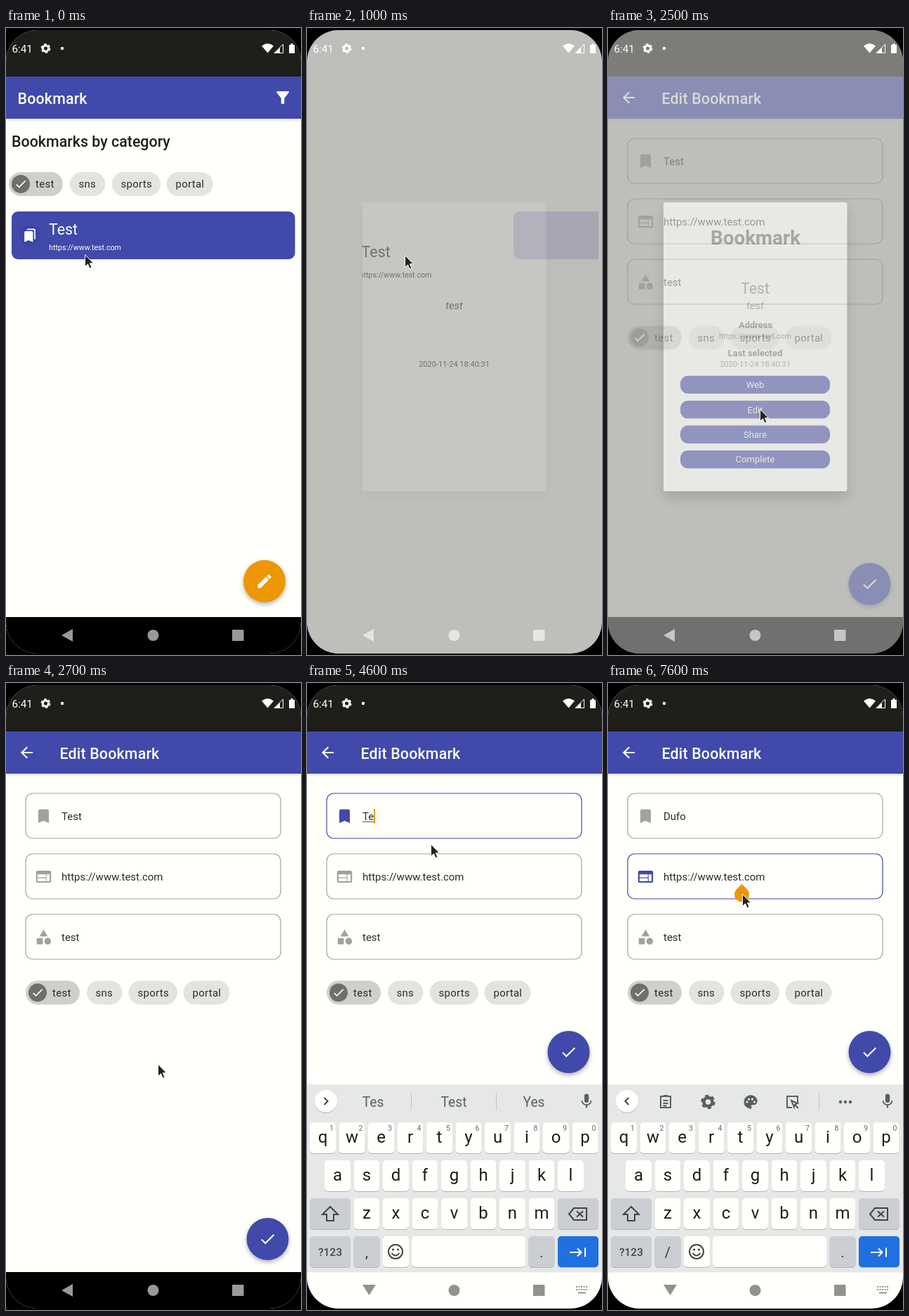
These frames come from a looping animation (420x892 px, 8000 ms). An HTML page:

```html
<!DOCTYPE html>
<html lang="en">
<head>
<meta charset="utf-8">
<title>Bookmark app</title>
<style>
html, body { margin: 0; width: 100%; height: 100%; overflow: hidden; background: #000; }
svg { display: block; width: 420px; height: 892px; font-family: Roboto, sans-serif; }
text { white-space: pre; }
.mid { text-anchor: middle; }
.raised { filter: drop-shadow(0 3px 3px rgba(0,0,0,.3)); }
.bar { filter: drop-shadow(0 1px 2px rgba(0,0,0,.2)); }
.key { filter: drop-shadow(0 1px 0 rgba(0,0,0,.22)); }
.window { filter: drop-shadow(0 9px 9px rgba(0,0,0,.22)); }
.line { fill: none; stroke-width: 2; }
</style>
</head>
<body>
<svg id="stage" viewBox="0 0 420 892"></svg>
<script>
const BLUE = '#4149ab', ORANGE = '#ee9704', PAPER = '#fffffb', INK = '#2b2b29', SOFT = '#71726d', KEYINK = '#5b5e61';
const DIM = 'rgba(0,0,0,.37)', CHIP = 'rgba(0,0,0,.11)', CHECKED = 'rgba(0,0,0,.19)';
const $ = id => document.getElementById(id);

const PATHS = {
  bookmark: 'M17 3H7c-1.1 0-2 .9-2 2v16l7-3 7 3V5c0-1.1-.9-2-2-2z',
  bookmarks: 'M19 18l2 1V3c0-1.1-.9-2-2-2H9C7.9 1 7 1.9 7 3h10c1.1 0 2 .9 2 2zM15 5H5c-1.1 0-2 .9-2 2v16l7-3 7 3V7c0-1.1-.9-2-2-2z',
  web: 'M20 4H4c-1.1 0-2 .9-2 2v12c0 1.1.9 2 2 2h16c1.1 0 2-.9 2-2V6c0-1.1-.9-2-2-2zm-5 14H4v-4h11zm0-5H4V9h11zm5 5h-4V9h4z',
  category: 'M12 2l-5.5 9h11zM3 13.5h8v8H3zM13 17.5a4.5 4.5 0 1 0 9 0a4.5 4.5 0 1 0-9 0',
  edit: 'M3 17.25V21h3.75L17.8 9.94l-3.75-3.75zM20.7 7.04a1 1 0 0 0 0-1.41l-2.34-2.34a1 1 0 0 0-1.41 0l-1.83 1.83 3.75 3.75z',
  check: 'M9 16.17L4.83 12l-1.42 1.41L9 19 21 7l-1.41-1.41z',
  back: 'M20 11H7.83l5.59-5.59L12 4l-8 8 8 8 1.41-1.41L7.83 13H20z',
  filter: 'M4.25 5.61L10 13v6c0 .55.45 1 1 1h2c.55 0 1-.45 1-1v-6l5.74-7.39c.51-.66.04-1.61-.79-1.61H5.04c-.83 0-1.3.95-.79 1.61z',
  mic: 'M12 14c1.66 0 3-1.34 3-3V5a3 3 0 0 0-6 0v6c0 1.66 1.34 3 3 3zm5.3-3c0 3-2.54 5.1-5.3 5.1S6.7 14 6.7 11H5c0 3.41 2.72 6.23 6 6.72V21h2v-3.28c3.28-.48 6-3.3 6-6.72z',
  palette: 'M12 3a9 9 0 0 0 0 18c.83 0 1.5-.67 1.5-1.5 0-.39-.15-.74-.39-1-.23-.27-.38-.62-.38-1 0-.83.67-1.5 1.5-1.5H16c2.76 0 5-2.24 5-5 0-4.42-4.03-8-9-8z'
};

// Markup helpers
const rect = (x, y, w, h, r, fill, more = '') => `<rect x="${x}" y="${y}" width="${w}" height="${h}" rx="${r}" fill="${fill}" ${more}/>`;
const circle = (x, y, r, fill, more = '') => `<circle cx="${x}" cy="${y}" r="${r}" fill="${fill}" ${more}/>`;
const text = (x, y, size, fill, str, more = '') => `<text x="${x}" y="${y}" font-size="${size}" fill="${fill}" ${more}>${str}</text>`;
const mid = (x, y, size, fill, str, more = '') => text(x, y, size, fill, str, 'class="mid" ' + more);
const line = (d, color, more = '') => `<path class="line" d="${d}" stroke="${color}" ${more}/>`;
const icon = (name, x, y, fill, s = 1.07, more = '') =>
  `<path d="${PATHS[name]}" fill="${fill}" transform="translate(${x} ${y}) scale(${s}) translate(-12 -12)" ${more}/>`;
const group = (id, body, more = '') => `<g id="${id}" ${more}>${body}</g>`;
const gear = (x, y, r, color) =>
  circle(x, y, r * .6, 'none', `stroke="${color}" stroke-width="${r * .45}"`) +
  circle(x, y, r * .87, 'none', `stroke="${color}" stroke-width="${r * .3}" stroke-dasharray="${r * .5} ${r * .411}"`);

const chips = (dx, dy) => `<g transform="translate(${dx} ${dy})">` +
  [['test', 4, 77, 42], ['sns', 91, 50.5, 103.5], ['sports', 150.5, 69.5, 163.5], ['portal', 228.5, 66, 241.5]].map(([name, x, w, tx], i) =>
    rect(x, 205, w, 34, 17, i ? CHIP : CHECKED) + text(tx, 227, 15, INK, name, 'letter-spacing=".27"')).join('') +
  circle(21, 222, 13, '#6f706b') + icon('check', 21, 222, '#fff', .8) + '</g>';

const chrome = (x, title) => rect(0, 0, 420, 69, 0, '#1e1f1a') + rect(0, 69, 420, 60, 0, BLUE, 'class="bar"') +
  rect(0, 838, 420, 54, 0, '#000') + text(x, 107.5, 21.4, PAPER, title, 'font-weight="500" letter-spacing=".16"');

const listPage = group('list', chrome(16.5, 'Bookmark') + icon('filter', 394, 99, '#fff', 1.12) +
  text(8, 169, 21.4, '#1e1f1c', 'Bookmarks by category', 'font-weight="500"') + chips(0, 0) +
  circle(368, 787, 30, ORANGE, 'class="raised"') + icon('edit', 368, 787, '#fff'));

const card = `<g clip-path="url(#row)">` + group('card', rect(8, 261, 403.5, 68, 9, BLUE) +
  group('cardBody', circle(34, 295, 14.5, '#3b43a6') + icon('bookmarks', 34, 295, '#fff', .87) +
    text(61, 293.5, 21.4, '#fff', 'Test') + text(61, 316, 10.7, '#fff', 'https://www.test.com'))) + '</g>';

const field = (i, name, str) => {
  const y = 157 + 86 * i;
  return rect(28, y, 363, 64, 10, 'none', `id="box${i}" stroke-width="1.2"`) +
    icon(name, 53.5, y + 32.5, DIM, 1.07, `id="icon${i}"`) + text(79, y + 38, 15, INK, str, `id="value${i}"`);
};
const editPage = group('edit', chrome(76.5, 'Edit Bookmark') + icon('back', 29.5, 99, '#fff') +
  field(0, 'bookmark', 'Test') + field(1, 'web', 'https://www.test.com') + field(2, 'category', 'test') +
  text(79, 195, 15, '#8f908b', 'Bookmark title', 'id="hint"') +
  rect(79, 197, 0, 1, 0, '#555', 'id="underline"') + rect(0, 0, 2, 21, 0, ORANGE, 'id="caret"') +
  chips(24, 218.5) +
  group('done', circle(372.5, 791, 30, BLUE, 'class="raised"') + icon('check', 372.5, 791, '#fff')));

const dialog = group('dialog', rect(79, 248, 261.5, 411, 3, PAPER) + group('content',
  mid(210, 308.3, 27.8, SOFT, 'Bookmark', 'font-weight="700"') +
  mid(210, 427, 12.9, SOFT, 'Address', 'font-weight="700"') +
  mid(209.5, 467, 12.9, SOFT, 'Last selected', 'font-weight="700"') +
  ['Web', 'Edit', 'Share', 'Complete'].map((name, i) =>
    rect(103, 494.8 + 35.4 * i, 213, 25.4, 11, BLUE) + mid(209.5, 512.2 + 35.4 * i, 13, '#fff', name)).join('') +
  rect(103, 530.2, 213, 25.4, 11, '#fff', 'id="press"')), 'class="window"');
const shared = `<g clip-path="url(#window)">` + group('shared',
  mid(209.5, 378, 21.4, SOFT, 'Test', 'id="name"') +
  mid(209.5, 400.3, 15, SOFT, 'test', 'font-style="italic"') +
  mid(209.5, 442, 10.7, SOFT, 'https://www.test.com', 'id="address"') +
  mid(209.5, 482, 11, SOFT, '2020-11-24 18:40:31')) + '</g>';

const keyRow = (letters, x, y) => [...letters].map((c, i) => {
  const kx = x + 41.5 * i;
  return rect(kx, y, 37, 44, 5, PAPER, 'class="key"') + mid(kx + 18.5, y + 28.5, 24, '#1d1d1c', c) +
    (letters.length > 9 ? mid(kx + 31, y + 12, 10.5, '#666', (i + 1) % 10) : '');
}).join('');
const altKey = (x, y, w, fill = '#cbced3') => rect(x, y, w, 44, 5, fill, 'class="key"');
const vline = x => rect(x, 583, 1, 25, 0, '#c3c5c5');
const keyboard = group('keyboard', rect(0, 571, 420, 270, 0, '#e6e8e7') +
  circle(27, 595, 16, PAPER, 'class="key"') + line('', '#444', 'id="chevron"') + icon('mic', 398, 595, KEYINK, 1.05) +
  group('words', vline(148) + vline(269) + [94, 209, 323].map((x, i) => mid(x, 602.5, 19.3, KEYINK, '', `id="word${i}"`)).join('')) +
  group('tools', vline(300) +
    line('M75 588h14v16h-14zM78.5 594h7M78.5 598h7M78.5 601.5h5M79 587h6', KEYINK) +
    gear(142.5, 596, 10, KEYINK) + icon('palette', 203, 596, KEYINK) +
    [[198, 596], [200.5, 592], [205.5, 592], [208.5, 596]].map(p => circle(...p, 1.6, '#e6e8e7')).join('') +
    line('M262 604h-7v-16h15v9M261 594l9 4-4 1.5-1 4zM266 600l5 5', KEYINK) +
    [331, 338, 345].map(x => circle(x, 596, 2.2, KEYINK)).join('')) +
  keyRow('qwertyuiop', 4, 625) + keyRow('asdfghjkl', 25, 679) + keyRow('zxcvbnm', 66.5, 733) +
  altKey(4, 733, 58) + line('M33 745l-11 11h6v9h10v-9h6z', '#444') +
  altKey(357, 733, 58) + line('M380 747h18v17h-18l-7-8.5zM384 751.5l9 8M393 751.5l-9 8', '#444') +
  altKey(4, 787, 58) + mid(33, 815, 15.5, '#444', '?123', 'font-weight="500"') +
  altKey(66.5, 787, 37) + mid(85, 816.5, 20, '#333', ',', 'id="comma"') +
  altKey(108, 787, 37, PAPER) + circle(126, 809, 10, 'none', 'stroke="#444" stroke-width="2"') +
  circle(122.5, 806, 1.6, '#444') + circle(129.5, 806, 1.6, '#444') + line('M120.5 811q5.5 7 11 0', '#444') +
  altKey(149, 787, 162, PAPER) + altKey(315.5, 787, 37) + mid(334, 816.5, 20, '#333', '.') +
  altKey(357, 787, 58, '#2070df') + line('M374 810h16M385 804.5l5.5 5.5-5.5 5.5M396 803.5v13', '#fff'));

const systemBars = text(8.5, 35, 15.2, '#fff', '6:41') + gear(56.5, 29, 6.8, '#fff') + circle(80, 29, 2.2, '#fff') +
  '<path d="M364 25.5q8.5-7 17 0l-8.5 10z" fill="#fff"/>' +
  '<path d="M382 35.5l12.5-12.5v12.5z" fill="none" stroke="#fff"/><path d="M382 36l8-8v8z" fill="#fff"/>' +
  '<path d="M403 24h2.5v-2h3v2h2.5v12h-8z" fill="#fff"/>' +
  rect(0, 838.5, 420, 54, 0, PAPER, 'id="lightNav"') +
  group('nav', '<path id="backKey"/>' + circle(209.5, 864, 8, 'inherit') + rect(322, 856, 16.5, 16, 1, 'inherit')) +
  group('switcher', [859, 863].map(y => line(`M383 ${y}h17`, '#91918d', 'stroke-dasharray="2 1.5"')).join('') + line('M386 867.5h11', '#91918d'));

$('stage').innerHTML = `<defs>
  <clipPath id="screen">${rect(0, 3, 420, 887, 45, '#000')}</clipPath>
  <clipPath id="row">${rect(0, 255, 415, 80, 0, '#000')}</clipPath>
  <clipPath id="window">${rect(78.5, 248, 262, 411, 0, '#000')}</clipPath></defs>
  <g clip-path="url(#screen)">${rect(0, 0, 420, 892, 0, PAPER)}${listPage}${card}
  ${rect(0, 0, 420, 892, 0, '#000', 'id="scrim"')}${dialog}${shared}${editPage}${keyboard}${systemBars}
  <path id="handle" d="M0 0L7.5 7.5A10.5 10.5 0 1 1-7.5 7.5z" fill="${ORANGE}"/></g>
  <path id="mouse" d="M0 0V17l4-3.6 2.6 6 2.9-1.2-2.6-5.9H12z" fill="#222" stroke="#fff"/>`;

// Linear track through [time, value...] points
function track(t, points, k = 1) {
  const i = points.findIndex(p => p[0] > t);
  if (i < 0) return points[points.length - 1][k];
  if (!i) return points[0][k];
  const a = points[i - 1], b = points[i];
  return a[k] + (b[k] - a[k]) * (t - a[0]) / (b[0] - a[0]);
}
const within = (t, a, b) => t >= a && t < b;
const set = (id, attrs) => { for (const k in attrs) $(id).setAttribute(k, attrs[k]); };
const fade = (id, v) => set(id, { opacity: v, visibility: v > 0 ? 'visible' : 'hidden' });
const move = (id, x, y) => set(id, { transform: `translate(${x} ${y})` });

const MOUSE = [[0, 112, 322], [100, 128, 306], [200, 145, 294], [300, 139, 323], [1000, 139, 323], [1300, 145, 507],
  [1500, 145, 507], [1600, 203, 545], [1700, 215, 561], [1800, 215, 561], [1900, 216, 542], [2700, 216, 542],
  [3100, 174, 195], [3200, 174, 195], [3400, 174, 191], [3800, 174, 191], [4100, 176, 229], [6400, 176, 229],
  [6500, 215, 270], [6600, 252, 313], [6700, 225, 308], [6900, 191, 300]];
const TYPING = [[0, 'Test', 'Test', 'Tests', 'Testing'], [4400, 'Tes', 'Tea', 'Tes', 'Test'], [4600, 'Te', 'Tes', 'Test', 'Yes'],
  [4800, 'T', 'The', 'To', 'This'], [5000, ''], [5600, 'D', 'Do', 'Did', 'Don’t'], [5900, 'Du', 'Due', 'Du', 'Dude'],
  [6000, 'Duf', 'Dug', 'Duf', 'Dud'], [6100, 'Dufo', 'Dufo', 'Info', 'Dug']];
// Texts carried from the card into the dialog: time, x, name y, address y
const ARC = [[880, 0, 0, 0], [1000, .13, .38, .31], [1100, .72, .9, .88], [1200, 1, 1, 1]];

function draw(t) {
  // Bookmark list fades while its card accelerates out to the right
  const list = track(t, [[700, 1], [1000, 0]]), leave = track(t, [[750, 0], [1050, 1]]);
  fade('list', list);
  fade('cardBody', list);
  fade('card', 1 - leave);
  move('card', 412 * leave * leave, 0);

  // Dialog coming and going
  fade('scrim', .6 * track(t, [[870, 0], [1000, .425], [1200, 1], [2350, 1], [2500, .425], [2650, 0]]));
  const win = track(t, [[950, 0], [1000, .12], [1200, 1], [2350, 1], [2500, .66], [2700, 0]]);
  const content = track(t, [[1000, 0], [1200, 1], [2350, 1], [2500, .7], [2700, 0]]);
  fade('dialog', win);
  fade('content', content);
  fade('shared', t < 2000 ? track(t, [[880, 0], [1000, 1]]) : win * content);
  const dx = 1 - track(t, ARC);
  move('name', -128 * dx, -84.5 * (1 - track(t, ARC, 2)));
  move('address', -96 * dx, -126 * (1 - track(t, ARC, 3)));
  fade('press', track(t, [[1800, 0], [1900, .18], [2000, .18], [2100, 0]]));

  // Edit page
  fade('edit', track(t, [[2350, 0], [2500, .41], [2700, 1]]));
  const focus = t < 3600 ? -1 : t < 6900 ? 0 : 1;
  for (const i of [0, 1, 2]) {
    set('box' + i, { stroke: i === focus ? BLUE : DIM });
    set('icon' + i, { fill: i === focus ? BLUE : DIM });
  }
  const [, value, ...words] = TYPING.filter(p => p[0] <= t).pop();
  $('value0').textContent = value;
  const width = value ? $('value0').getComputedTextLength() : 0;
  set('underline', { width: focus ? 0 : width });
  fade('hint', within(t, 5400, 5600) ? 1 : 0);
  const onUrl = t >= 7100;
  fade('caret', within(t, 3700, 5400) || within(t, 5600, 6600) || within(t, 7100, 7600) ? 1 : 0);
  move('caret', onUrl ? 189.5 : 79 + width, onUrl ? 265 : 179);
  fade('handle', within(t, 3900, 4400) || onUrl ? 1 : 0);
  move('handle', onUrl ? 190.5 : 80 + width, onUrl ? 286 : 200);
  move('done', 0, t < 3800 ? 0 : -266);

  // Keyboard
  const down = 1 - track(t, [[3600, 0], [4000, 1]]), open = t >= 3700;
  fade('keyboard', open ? 1 : 0);
  move('keyboard', 0, 268 * down * down);
  const tools = !value || t >= 7000;
  fade('tools', tools ? 1 : 0);
  fade('words', tools ? 0 : 1);
  words.forEach((w, i) => $('word' + i).textContent = w);
  set('chevron', { d: tools ? 'M29.5 590l-5 5 5 5' : 'M24.5 590l5 5-5 5' });
  $('comma').textContent = t >= 7000 ? '/' : ',';

  fade('lightNav', open ? 1 : 0);
  fade('switcher', open ? 1 : 0);
  set('nav', { fill: open ? '#91918d' : '#fff', opacity: open ? 1 : .6 });
  set('backKey', { d: open ? 'M79 856h19l-9.5 15z' : 'M79 864l16-9v18z' });
  move('mouse', track(t, MOUSE, 1) + .5, track(t, MOUSE, 2) + .5);
}

// The screen updates ten times a second
function tick() {
  draw(Math.floor(performance.now() % 8000 / 100) * 100);
  requestAnimationFrame(tick);
}
tick();
</script>
</body>
</html>
```
